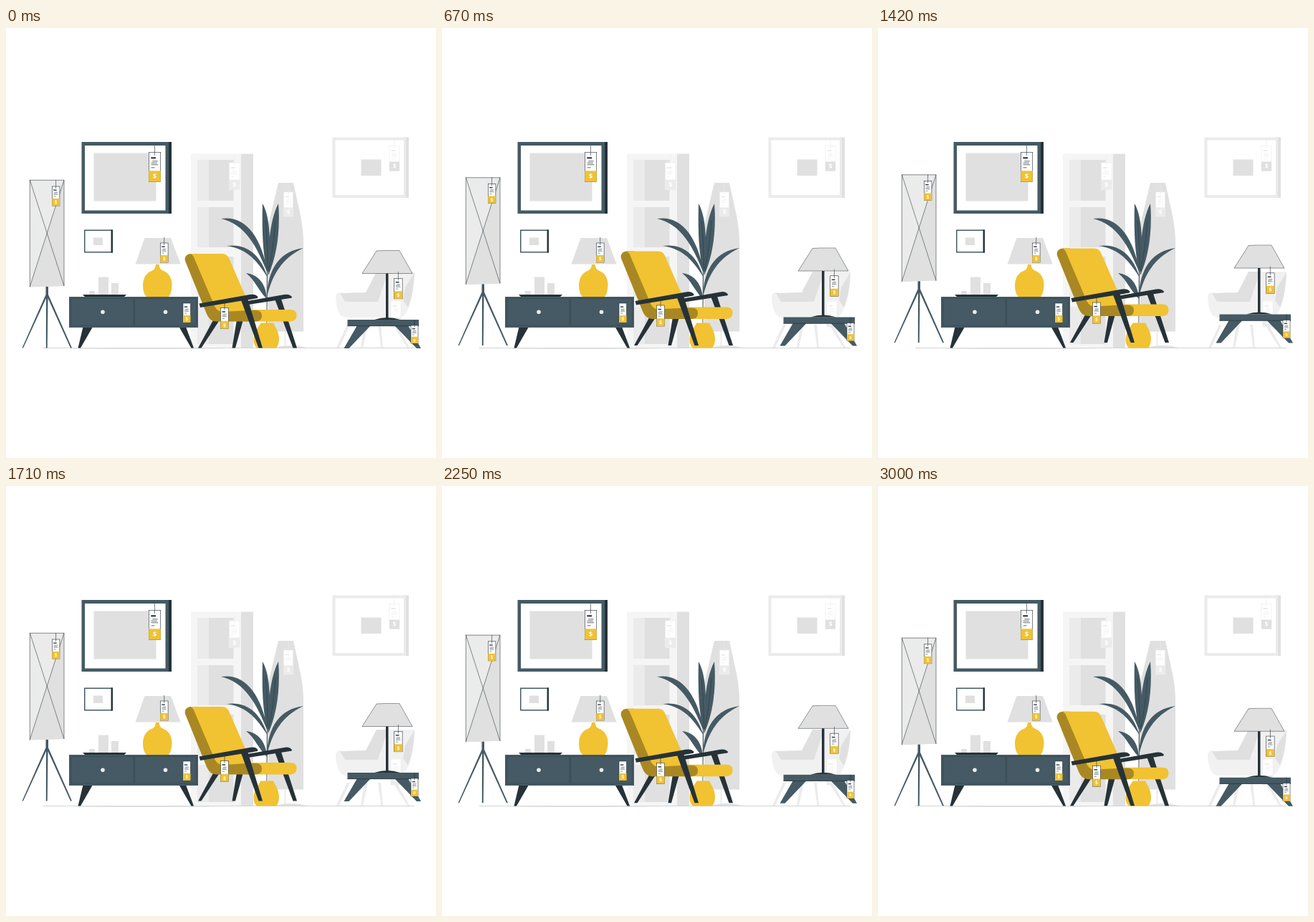
Write an HTML page that moves like this. It is 600x600 px and loops after 3040 ms.

```html
<!DOCTYPE html>
<html>
<head>
<meta charset="utf-8">
<style>
html, body { margin: 0; width: 100%; height: 100%; overflow: hidden; background: #fff; }
svg { display: block; width: 100vw; height: 100vh; }
text { font-family: "Open Sans", Arial, sans-serif; font-weight: 700; text-anchor: middle; }
</style>
</head>
<body>
<svg id="stage" viewBox="0 0 600 600"></svg>
<script>
const SLATE = '#455a64', INK = '#263238', YELLOW = '#f1c232', OLIVE = '#a98823';
const GREY = '#e0e0e0', LIGHT = '#ebebeb', PALE = '#f5f5f5', WHITE = '#fff';
const LOOP = 3040, FRAMES = 73, STEP = 125 / 3, RISE = 8;

const box = (x1, y1, x2, y2, fill) =>
  `<rect x="${x1}" y="${y1}" width="${x2 - x1}" height="${y2 - y1}" fill="${fill}"/>`;
const path = (d, fill) => `<path d="${d}" fill="${fill}"/>`;
const line = (d, color, width) =>
  `<path d="${d}" fill="none" stroke="${color}" stroke-width="${width}"/>`;
const dot = (x, y, r, fill) => `<circle cx="${x}" cy="${y}" r="${r}" fill="${fill}"/>`;
const float = body => `<g class="float">${body}</g>`;

// Price tag; ink and band set its colours, top is where the string starts.
function tag(x, y, w, h, top, ink = INK, band = YELLOW, edge = ink) {
  const cx = x + w / 2, split = y + h * 0.63;
  const row = (k, a, b, width) =>
    line(`M${x + w * a} ${y + h * k}H${x + w * b}`, ink, width);
  return box(x, y, x + w, y + h, WHITE) +
    row(0.19, 0.18, 0.6, h * 0.05) +
    [[0.3, 0.3, 0.75], [0.36, 0.2, 0.7], [0.42, 0.2, 0.78], [0.52, 0.2, 0.5]]
      .map(([k, a, b]) => row(k, a, b, h * 0.018)).join('') +
    `<rect x="${x}" y="${y}" width="${w}" height="${h}" fill="none" stroke="${edge}" stroke-width=".6"/>` +
    box(x, split, x + w, y + h, band) +
    `<text x="${cx}" y="${split + h * 0.27}" font-size="${h * 0.235}" fill="${WHITE}">$</text>` +
    (top ? line(`M${cx} ${top}V${y + h * 0.11}`, edge, 0.6) : '');
}

const paleTag = (x, y, w, h, top) => tag(x, y, w, h, top, LIGHT, GREY);

const cabinet = () =>
  box(258, 175.5, 328, 446, PALE) + box(328, 175.5, 345, 446, GREY) +
  [[184, 241], [250, 306], [319, 375], [389, 441]].map(([a, b]) =>
    box(267, a, 283, b, LIGHT) + box(283, a, 317.5, b, GREY)).join('') +
  tag(311.5, 188, 14.5, 37.5, 177, LIGHT, LIGHT);

const mirror = () =>
  box(388.5, 423, 390.5, 446, LIGHT) +
  path('M374 446Q397 440 420 446Z', GREY) +
  path('M380 216H401L411 262Q415 281 415 300V423.500H363V300Q364 280 369 262Z', GREY) +
  tag(387.5, 229, 13, 34, 217, LIGHT, LIGHT);

const frames = () =>
  box(224, 159, 231, 259, INK) + box(105.5, 159, 227, 259, SLATE) +
  box(110, 164, 222.5, 254.5, WHITE) + box(122.5, 174.5, 209.5, 241.5, GREY) +
  tag(199.3, 173.5, 16.4, 41, 164) +
  box(109, 281.5, 149, 313.5, SLATE) + box(146.5, 281.5, 149, 313.5, INK) +
  box(110.5, 283, 146.5, 312, WHITE) + box(122, 292.5, 135, 303, GREY) +
  box(555, 152.500, 562, 237, GREY) + box(455.5, 152.5, 558, 237, LIGHT) +
  box(459.5, 156.5, 555, 233, WHITE) + box(495.5, 183.5, 523.5, 206, GREY) +
  paleTag(535, 164.5, 14, 35, 156);

const armchair = () =>
  path('M476 414H480L465 446H461ZM500 414H505L498 446H495ZM519 414H523L526 446H523.500ZM540 414H545L563 446H560Z', LIGHT) +
  path('M460 378C459 369 465 368 471 370L502 369L517 340H570Q569 380 557 399Q554 404 548 404H474Q462 403 460 378Z', '#f1f1f1') +
  path('M466 370L502 369L517 340H533L519 382H473Z', GREY) +
  path('M570 341Q569 370 561 390L554 380L557 362Z', GREY) +
  tag(537, 381, 14, 36, 0, LIGHT, LIGHT);

const ground = () =>
  line('M52 446.500H570', '#c4c9cb', 0.8) +
  path('M80 446.500H315Q300 448 198 448Q95 448 80 446.500Z', GREY);

const plant = () =>
  line('M364.500 340L364 413', SLATE, 1) + line('M365.500 376L365 413', WHITE, 1) +
  path([
    'M300 266C332 261 356 287 366 345C350 304 334 274 300 266Z',
    'M308 304C336 300 356 317 365 348C347 319 333 308 308 304Z',
    'M358 245C368 262 371 300 365 343C358 315 357 280 358 245Z',
    'M380 245C383 282 378 318 366 345C365 302 369 266 380 245Z',
    'M415 307C383 311 365 335 364 376C371 345 385 321 415 307Z',
    'M335 342C352 344 363 357 364 378C352 366 347 351 335 342Z'
  ].join(''), SLATE) +
  line('M362 268Q366 310 365 340M376 268Q373 310 366 340', INK, 0.5) +
  path('M355.500 411.500H373C376 418 381 424 381 434Q381 442 377 446.500H350Q345 442 345.500 434C346 424 352 418 355.500 411.500Z', YELLOW);

const sideboard = () =>
  path('M107.500 417H121L104 446.500H100.500ZM241.500 417H251L262 446.500H258.500Z', INK) +
  box(88, 375, 268, 418, SLATE) +
  line('M90.500 377.500H178V415H90.500ZM179.500 377.500H265.500V415H179.500Z', '#33454e', 0.7) +
  dot(135, 396.3, 2.8, LIGHT) + dot(222.5, 396.3, 2.8, LIGHT) +
  box(129, 347.5, 143, 372, GREY) + box(147, 356, 157, 372, GREY) + box(116, 367, 124, 372, GREY) +
  path('M107 372H168L165 375H110Z', INK) +
  path('M209 330H213.500Q214 337 220 339C228 342 232 351 231.500 359Q231 370 227 375H196Q191 370 191 359C191 350 195 342 203 339Q208.500 337 209 330Z', YELLOW) +
  path('M193.500 293H230L243.500 329.500H180.500Z', GREY) +
  tag(215.3, 300, 10.8, 27, 292) +
  tag(247, 384, 10.5, 27, 0);

const chair = () =>
  path('M322 407H331L320 446.500H315.500ZM375 378H384L406 446.500H400.500Z', INK) +
  path('M337 381L388 372Q395 370.500 399 375Q399 377 396 377L338 386Z', INK) +
  path('M290 406H299L272.500 446.500H268Z', INK) +
  path('M335 393H397Q405.500 393 405.500 401T397 409.500H335Z', YELLOW) +
  path('M257 315H268L302 394H349Q357 394 357 401.500T349 409.500H293Q284 409 280 399L250 325Q248 317 257 315Z', OLIVE) +
  path('M258 315H302Q308 315 311 321L342 392Q342 394 338 394L302 396Q295 396 291 388L263 322Q261 316 257 315Z', YELLOW) +
  path('M327 377H337L358 446.500H352.500Z', INK) +
  path('M269.500 384.500L340 372Q348 370.500 351.500 375Q351.500 377.500 348 377.500L271 390Z', INK) +
  tag(299.5, 390.500, 11, 29, 383);

const floorLamp = () =>
  path('M55.500 360H59V372L92 446.500H90L58.500 377L57.700 446.500H55.800L56 377L24 446.500H22.500L55.500 372Z', SLATE) +
  path('M33 212H81V360L33 361.500Z', LIGHT) +
  path('M81 212V360L33 361.500Z', GREY) +
  line('M33.300 212.300H81V360M33.300 212V361.500M33.300 212L81 360M81 212L33.300 361', INK, 0.55) +
  tag(64.3, 221, 10.6, 27, 212);

const sideTable = () =>
  path('M490 415H509L478.500 447H471.500ZM542 415H561L579 447H573Z', SLATE) +
  box(476.5, 407, 576, 416, SLATE) + line('M476.500 415.700H576', INK, 0.7) +
  box(530, 342, 533.5, 405, INK) + path('M514 407Q532 401 550 407Z', INK) +
  path('M517 311H549L567 342.500H497Z', GREY) +
  line('M517 311L528 310.500H549L567 342.500H497L517 311', INK, 0.5) +
  tag(541.7, 349.3, 11.4, 28.500, 340) +
  tag(565, 415, 10, 25, 407);

const stage = document.getElementById('stage');
stage.innerHTML = cabinet() + mirror() + frames() + ground() + armchair() +
  plant() + sideboard() + float(chair()) + float(floorLamp()) + float(sideTable());
const floats = [...stage.querySelectorAll('.float')];

const start = performance.now();
function draw(now) {
  const t = Math.max(0, now - start) % LOOP;
  const step = Math.min(FRAMES - 1, Math.floor((t + 4.9) / STEP));
  const lift = RISE * (1 - Math.abs(2 * step / FRAMES - 1));
  for (const g of floats) g.setAttribute('transform', `translate(0 ${-lift})`);
  requestAnimationFrame(draw);
}
draw(start);
</script>
</body>
</html>
```
